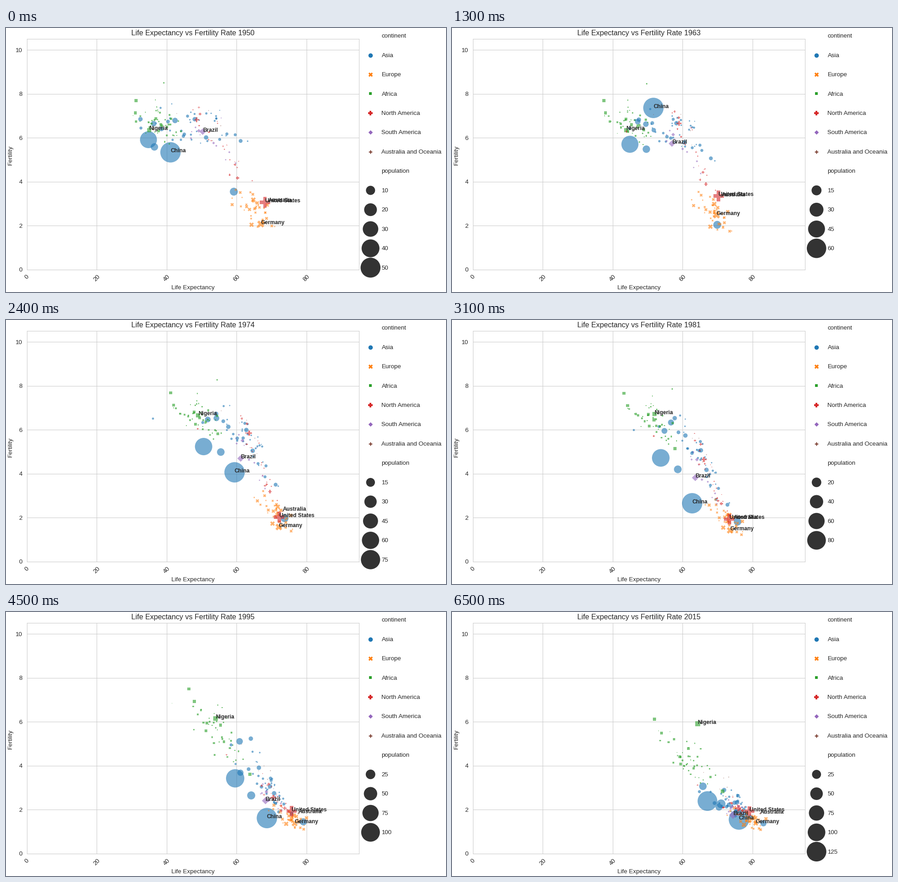
A matplotlib script for the animation above (6.6 s loop, 966x580 px).

```python
import numpy as np
import matplotlib.pyplot as plt
from matplotlib.animation import FuncAnimation

W, H, DPI = 966, 580, 100
PT = 72 / DPI
INK = ".15"
FIRST, LAST = 1950, 2015
STYLE = {
    "Asia": ("C0", "o"),
    "Europe": ("C1", "X"),
    "Africa": ("C2", (4, 0, 45)),
    "North America": ("C3", "P"),
    "South America": ("C4", (4, 0, 0)),
    "Australia and Oceania": ("C5", (4, 1, 0)),
}

plt.rcParams.update({
    "font.family": "Liberation Sans", "font.size": 13.45 * PT,
    "text.color": INK, "xtick.color": INK, "ytick.color": INK,
    "axes.edgecolor": ".8", "axes.linewidth": 1.08 * PT,
    "grid.color": ".8", "grid.linewidth": 1.08 * PT,
})

paths = {name: [] for name in STYLE}
labels = []


def pulses(year, items):
    """Sum of short-lived bumps given as (amount, peak year, width)."""
    return sum(a * np.exp(-((year - peak) / width) ** 2) for a, peak, width in items)


def country(continent, share, life, births, label=None, shocks=(), booms=()):
    """Life eases from start to end; births fall along a logistic curve."""
    begin, end, power = life
    high, low, middle, width = births

    def path(year):
        u = (year - FIRST) / (LAST - FIRST)
        x = begin + (end - begin) * u ** power + pulses(year, shocks)
        y = low + (high - low) / (1 + np.exp((year - middle) / width)) + pulses(year, booms)
        return x, y, share[0] + (share[-1] - share[0]) * u ** 2

    paths[continent].append(path)
    if label:
        labels.append((label, path))


def crowd(continent, count, seed, start, end, power, high, low, middle,
          size, cap, lead_high=.3, lag=6, setback=0):
    """Smaller countries; those in the lead live longer and change earlier."""
    rng = np.random.default_rng(seed)
    for _ in range(count):
        lead, late, wobble, floor = np.clip(rng.normal(size=4), -1.9, 1.9)
        share = min(size * np.exp(rng.normal()), cap)
        fall = -min(rng.exponential(setback), 16)
        country(continent, (share,),
                (start[0] + start[1] * lead, end[0] + end[1] * (.8 * lead + .5 * late), power),
                (high + .5 * wobble - lead_high * lead,
                 low * (1 + .12 * floor - .08 * lead), middle - lag * lead, 7),
                shocks=[(fall, 2002, 9)])


# Asia
country("Asia", (1,), (41.1, 76.1, .65), (5.35, 1.55, 1977, 4.5), "China",
        shocks=[(-28, 1960, 1.8)], booms=[(2.5, 1964, 4), (-2.8, 1960.5, 1.5)])
country("Asia", (.69, .935), (34.8, 67.1, .72), (6, 2.15, 1988, 10))
country("Asia", (.13, .184), (36.5, 71, .6), (5.6, 2.25, 1983, 6))
country("Asia", (.15, .09), (59.2, 83.1, .5), (2.05, 1.38, 1984, 5), booms=[(1.5, 1950, 4)])
country("Asia", (.07, .135), (36.3, 65.8, .5), (6.65, 2.75, 1998, 7))
country("Asia", (.07, .115), (42.4, 70.4, 1.1), (6.8, 2, 1991, 6.5))
country("Asia", (.009,), (41, 68, 1), (6.9, 2.7, 1990, 7), shocks=[(-34, 1977, 3.3)])
crowd("Asia", 42, 4, (47, 8.5), (74, 4), .6, 6.6, 2.2, 1985, .009, .045, .2, 8)

# Europe
country("Europe", (.12, .058), (66.9, 80.9, 1), (2.07, 1.38, 1970, 4), "Germany",
        booms=[(.53, 1962, 6)])
crowd("Europe", 38, 12, (64.8, 3.2), (78.8, 2.8), .8, 2.85, 1.52, 1975, .011, .08, .3, 4)

# Africa
country("Africa", (.07, .13), (35, 64.6, .75), (6.35, 5.9, 1996, 5), "Nigeria",
        shocks=[(-4.8, 2000, 9)], booms=[(.5, 1978, 6)])
country("Africa", (.038, .067), (38.6, 71.4, .72), (6.6, 2.75, 1985, 8))
country("Africa", (.007,), (39.2, 67, .6), (8.5, 3.9, 1992, 6), shocks=[(-47, 1994, .9)])
crowd("Africa", 45, 21, (38, 4), (62, 4.6), .75, 6.75, 4, 1999, .009, .04, .1, 8, 3.5)

# Americas
country("North America", (.28, .225), (68.1, 79.1, 1), (3.05, 1.93, 1968, 2.5),
        "United States", booms=[(.45, 1962, 6)])
country("North America", (.052, .09), (48.6, 75.9, .6), (6.85, 2.05, 1982, 6))
country("North America", (.007,), (36.2, 64.3, .8), (6.4, 2.8, 1994, 9),
        shocks=[(-32, 2010, .5)])
crowd("North America", 20, 33, (55, 5.5), (75, 2.6), .6, 5.8, 2.1, 1980, .0035, .025, .9, 5)
country("South America", (.1, .147), (50.3, 74.4, .8), (6.5, 1.65, 1979, 9.5), "Brazil")
crowd("South America", 11, 45, (51, 6), (74.5, 2), .7, 6.3, 2.1, 1982, .009, .03)

# Oceania
country("Australia and Oceania", (.016,), (69.1, 82.2, 1.15), (3.08, 1.83, 1972, 4),
        "Australia", booms=[(.38, 1962, 6)])
crowd("Australia and Oceania", 6, 57, (50, 6), (70, 3.5), .6, 6.6, 3, 1985, .0008, .002)


def largest(year):
    """Largest population, in tens of millions."""
    return np.interp(year, (1950, 1963, 1981, 1995, 2015), (54.4, 68.5, 99.6, 123.8, 140))


def area(share, extra=0):
    """Marker area in square points for a population share."""
    return ((np.sqrt(4 + 2000 * share) + extra) * PT) ** 2


fig = plt.figure(figsize=(W / DPI, H / DPI), dpi=DPI, facecolor="white")
ax = fig.add_axes([45.5 / W, 1 - 530.8 / H, 729.6 / W, 506.6 / H])
ax.set(xlim=(0, 95), ylim=(0, 10.5), xticks=range(0, 81, 20), yticks=range(0, 11, 2))
ax.set_axisbelow(True)
ax.grid(True)
ax.tick_params(length=0, pad=9.4 * PT)
ax.tick_params(axis="x", labelrotation=45)
title = ax.set_title("", fontsize=16.15 * PT, pad=8 * PT)

page = fig.add_axes([0, 0, 1, 1])
page.set(xlim=(0, W), ylim=(H, 0))
page.axis("off")
page.text(410.5, 573.7, "Life Expectancy", ha="center")
page.text(13, 279, "Fertility", ha="center", va="baseline", rotation=90,
          rotation_mode="anchor")


def row_y(i):
    return 17.1 + 42.45 * i


def row_text(i, text=""):
    return page.text(824.5, row_y(i) + 4.1, text)


row_text(0, "continent")
row_text(7, "population")
dots = {}
for i, (name, (color, marker)) in enumerate(STYLE.items(), 1):
    row_text(i, name)
    page.scatter(800.3, row_y(i), s=(9.6 * PT) ** 2, c=color, marker=marker, linewidths=0)
    zeros = np.zeros(len(paths[name]))
    dots[name] = ax.scatter(zeros, zeros, c=color, marker=marker, alpha=.6,
                            linewidths=0, zorder=2 + i / 10)
sizes = page.scatter([800.3] * 5, [row_y(8 + i) for i in range(5)], s=0, c=".2", linewidths=0)
size_texts = [row_text(8 + i) for i in range(5)]
tags = [ax.text(0, 0, name, fontsize=12.05 * PT, fontweight="bold", zorder=5)
        for name, _ in labels]


def draw(frame):
    year = FIRST + frame
    title.set_text(f"Life Expectancy vs Fertility Rate {year}")
    for name, dot in dots.items():
        now = np.array([path(year) for path in paths[name]])
        dot.set_offsets(now[:, :2])
        dot.set_sizes(area(now[:, 2]))
    for tag, (_, path) in zip(tags, labels):
        tag.set_position(path(year)[:2])

    top = largest(year)
    step = next(s for s in (10, 15, 20, 25) if s >= top / 6)
    ticks = step * np.arange(1, 6)
    shown = ticks <= top
    sizes.set_sizes(np.where(shown, area(ticks / top, .8), 0))
    for text, tick, on in zip(size_texts, ticks, shown):
        text.set_text(str(tick) if on else "")
    return []


anim = FuncAnimation(fig, draw, frames=LAST - FIRST + 1, interval=100, repeat=True)
plt.show()
```
